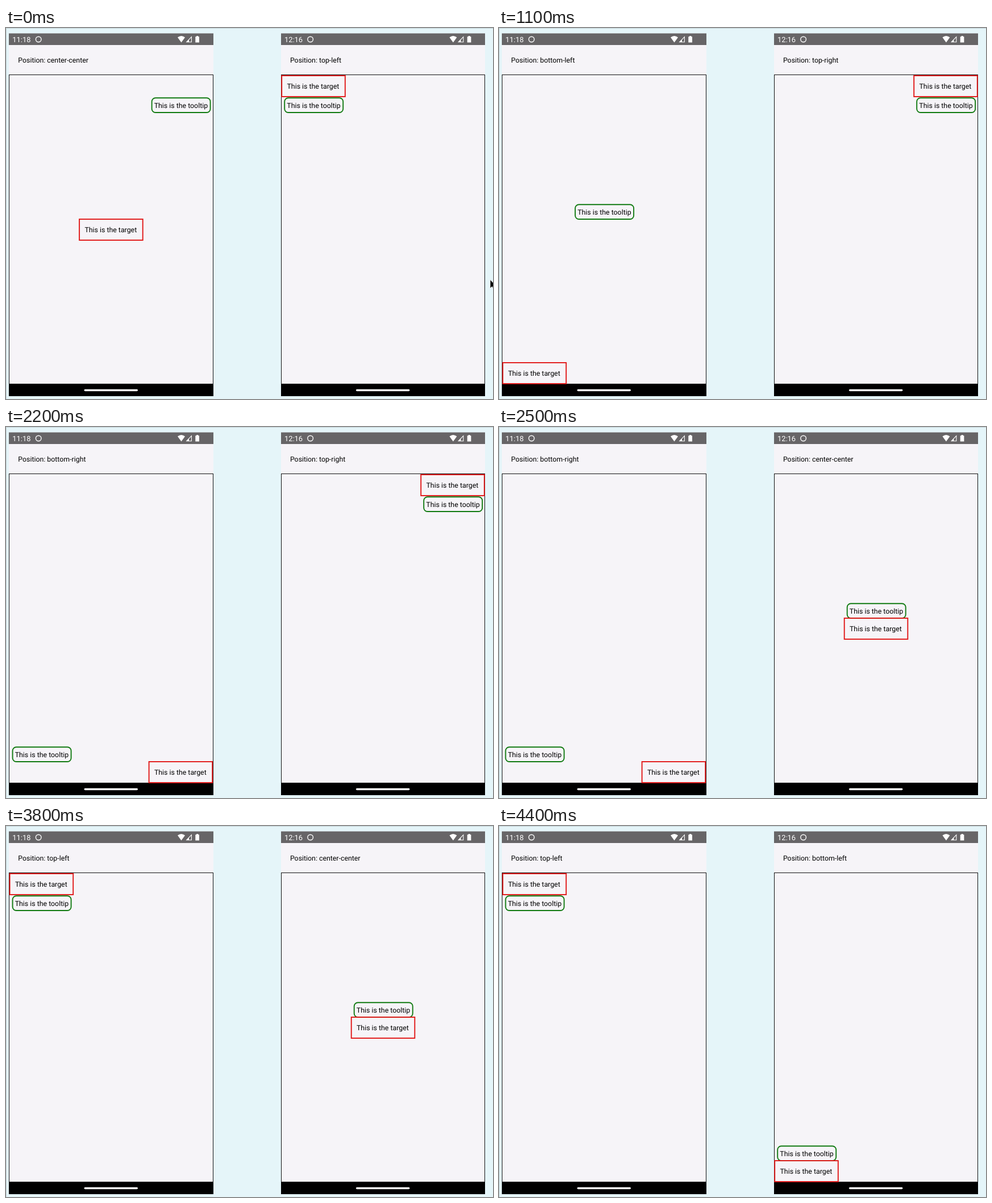
An HTML page that plays this animation: 857x654 px, repeating every 4500 ms.

```html
<!DOCTYPE html>
<html lang="en">
<head>
<meta charset="utf-8">
<title>Tooltip positions</title>
<style>
html, body { margin: 0; width: 100%; height: 100%; overflow: hidden; background: #e5f5f9; }
svg { display: block; }
text { font: 12.35px Roboto, "Liberation Sans", sans-serif; fill: #000; text-rendering: geometricPrecision; }
.clock { font-size: 12.9px; fill: #fff; }
.red { fill: none; stroke: #e11717; stroke-width: 1.9; }
.green { fill: none; stroke: #117a11; stroke-width: 1.9; }

/* Column step 122.5, row step 253; a tooltip sits below its target only in the top row */
.anim { animation: 4.5s step-end infinite; }
.left-target { animation-name: left-target; }
.left-tip { animation-name: left-tip; }
.left-label { animation-name: left-label; }
.right-target { animation-name: right-target; }
.right-tip { animation-name: right-tip; }
.right-label { animation-name: right-label; }
.cursor { animation-name: cursor; }

@keyframes left-target {
  0% { transform: translate(122.5px, 253px); }
  17.6% { transform: translate(0, 506px); }
  44.3% { transform: translate(245px, 506px); }
  70.9%, 100% { transform: translate(0, 0); }
}
@keyframes left-label {
  0% { transform: translateY(0); }
  17.6% { transform: translateY(-20px); }
  44.3% { transform: translateY(-40px); }
  70.9%, 100% { transform: translateY(-60px); }
}
@keyframes left-tip {
  0% { transform: translate(245px, 0); }
  4.3% { transform: translate(122.5px, 188px); }
  30.9% { transform: translate(0, 441px); }
  57.6% { transform: translate(245px, 441px); }
  82%, 100% { transform: translate(0, 0); }
}
@keyframes right-target {
  0% { transform: translate(0, 0); }
  15.4% { transform: translate(245px, 0); }
  50.9% { transform: translate(122.5px, 253px); }
  86.5%, 100% { transform: translate(0, 506px); }
}
@keyframes right-tip {
  0% { transform: translate(0, 0); }
  15.4% { transform: translate(245px, 0); }
  50.9% { transform: translate(122.5px, 188px); }
  86.5%, 100% { transform: translate(0, 441px); }
}
@keyframes right-label {
  0% { transform: translateY(0); }
  15.4% { transform: translateY(-20px); }
  50.9% { transform: translateY(-40px); }
  86.5%, 100% { transform: translateY(-60px); }
}
@keyframes cursor {
  0% { visibility: visible; }
  2.1%, 100% { visibility: hidden; }
}
</style>
</head>
<body>
<svg width="857" height="654" viewBox="0 0 857 654">
  <defs>
    <g id="status">
      <circle cx="57.2" cy="20" r="4.8" fill="none" stroke="#fff" stroke-width="1.4"/>
      <path d="M302 16.6 Q308.5 11.6 315 16.6 L308.5 25.4 Z" fill="#fff"/>
      <path d="M317.8 24.7 L326.4 15.6 V24.7 Z" fill="none" stroke="#fff" stroke-width="1.1"/>
      <path d="M317.5 25 L322 20.2 V25 Z" fill="#fff"/>
      <path d="M333.3 15.2 H335.2 V14 H338.2 V15.2 H340 V25.4 H333.3 Z" fill="#fff"/>
      <rect x="137.5" y="636.8" width="94.5" height="3.4" rx="1.7" fill="#f2f2f2"/>
    </g>
    <g id="target">
      <rect class="red" x="6.6" y="84" width="111.6" height="37"/>
      <text x="15.9" y="107">This is the target</text>
    </g>
    <g id="tip">
      <rect class="green" x="11.6" y="123.2" width="103" height="25.8" rx="6.5"/>
      <text x="15.7" y="140.6">This is the tooltip</text>
    </g>
  </defs>

  <rect width="857" height="654" fill="#e5f5f9"/>
  <path d="M0 .5 H857 M.5 0 V654" stroke="#c3d3d7"/>

  <g>
    <rect x="5" y="9.5" width="360" height="639.5" fill="#f6f4f8"/>
    <rect x="5" y="9.5" width="360" height="20.5" fill="#676567"/>
    <rect x="5" y="627" width="360" height="22" fill="#000"/>
    <rect x="5.5" y="82.5" width="359" height="545" fill="none" stroke="#111"/>
    <use href="#status"/>
    <text class="clock" x="11.3" y="24.7">11:18</text>
    <svg x="21" y="47" width="200" height="20">
      <g class="anim left-label">
        <text x=".3" y="14">Position: center-center</text>
        <text x=".3" y="34">Position: bottom-left</text>
        <text x=".3" y="54">Position: bottom-right</text>
        <text x=".3" y="74">Position: top-left</text>
      </g>
    </svg>
    <g class="anim left-tip"><use href="#tip"/></g>
    <g class="anim left-target"><use href="#target"/></g>
  </g>

  <g>
    <rect x="484" y="9.5" width="359" height="639.5" fill="#f6f4f8"/>
    <rect x="484" y="9.5" width="359" height="20.5" fill="#676567"/>
    <rect x="484" y="627" width="359" height="22" fill="#000"/>
    <rect x="484.5" y="82.5" width="358" height="545" fill="none" stroke="#111"/>
    <use href="#status" x="478.4"/>
    <text class="clock" x="489.9" y="24.7">12:16</text>
    <svg x="499" y="47" width="200" height="20">
      <g class="anim right-label">
        <text x=".9" y="14">Position: top-left</text>
        <text x=".9" y="34">Position: top-right</text>
        <text x=".9" y="54">Position: center-center</text>
        <text x=".9" y="74">Position: bottom-left</text>
      </g>
    </svg>
    <g class="anim right-tip"><use href="#tip" x="478.6"/></g>
    <g class="anim right-target"><use href="#target" x="478.6"/></g>
  </g>

  <path class="anim cursor" d="M852 443.5 V459 L855.4 455.8 L857.8 461.4 L860 460.4 L857.6 455 H863 Z" fill="#000" stroke="#fff" stroke-width=".8"/>
</svg>
</body>
</html>
```
